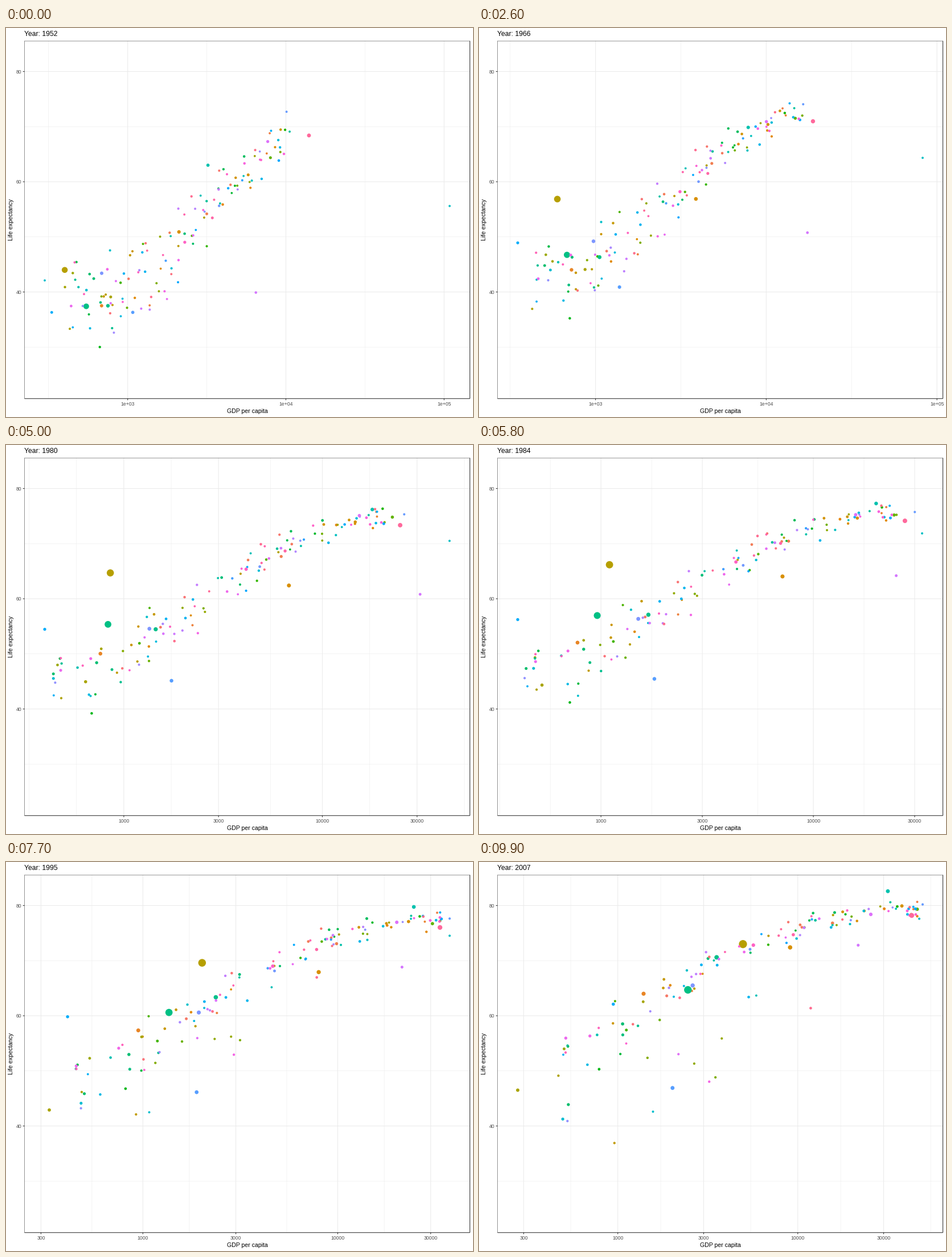
A matplotlib script for the animation above (10 s loop, 820 by 683 pixels).

```python
import numpy as np
import matplotlib.pyplot as plt
from matplotlib.animation import FuncAnimation
from matplotlib.collections import LineCollection

W, H, DPI = 820, 683, 64
PT = 72 / DPI
LEFT, RIGHT, TOP, BOTTOM = 32.45, 814.52, 22.7, 650.7
FRAMES, COUNTRIES = 100, 142
T = np.linspace(0, 1, FRAMES)
YEARS = 1952 + 55 * T
rng = np.random.default_rng(12)


def track(points):
    """Log GDP (and life expectancy) along a few dated key points."""
    years, gdp, *life = zip(*points)
    g = np.interp(YEARS, years, np.log10(gdp))
    return (g, np.interp(YEARS, years, life[0])) if life else g


# poorest and richest economy: these bound the x axis
LOW = track([(1952, 299), (1960, 365), (1967, 349), (1977, 371), (1982, 424),
             (1992, 347), (2002, 241), (2007, 278)])
HIGH = track([(1952, 108400), (1957, 113500), (1967, 80900), (1972, 109300),
              (1982, 33700), (1987, 31500), (2007, 49400)])

# hue rank: millions of people, then (year, GDP per capita, life expectancy)
KEY = {
    24: (1318, [(1952, 400, 44), (1957, 576, 50.5), (1962, 488, 44.5),
                (1967, 613, 58.4), (1980, 860, 64.8), (2000, 2720, 71.3),
                (2007, 4959, 73)]),
    58: (1110, [(1952, 547, 37.4), (1980, 835, 55.5), (2000, 1618, 62.4),
                (2007, 2452, 64.7)]),
    134: (301, [(1952, 13990, 68.4), (2007, 42952, 78.2)]),
    59: (224, [(1952, 750, 37.5), (1980, 1455, 54.6), (2007, 3541, 70.6)]),
    14: (190, [(1952, 2109, 50.9), (1980, 6850, 62.5), (2007, 9066, 72.4)]),
    97: (169, [(1952, 685, 43.4), (2007, 2606, 65.5)]),
    8: (150, [(1952, 684, 37.5), (1989, 790, 54.2), (2007, 1391, 64)]),
    94: (135, [(1952, 1077, 36.3), (1980, 1745, 45.2), (2007, 2014, 46.9)]),
    66: (127, [(1952, 3217, 63), (1980, 18100, 76.3), (2007, 31656, 82.6)]),
    71: (2.5, [(1952, 120000, 55.6), (1972, 140000, 67.7), (1982, 31354, 71.3),
               (2007, 47307, 77.6)]),
    95: (4.6, [(1952, 10095, 72.7), (1987, 33000, 76), (2007, 50000, 80.2)]),
    109: (28, [(1952, 6460, 39.9), (1977, 36000, 58.7), (1987, 21198, 66.3),
               (2007, 21655, 72.8)]),
    87: (48, [(1952, 331, 36.3), (1967, 340, 49.4), (1992, 340, 59.3),
              (2007, 944, 62.1)]),
    27: (65, [(1952, 781, 39.1), (1972, 905, 46), (1997, 300, 42.6),
              (2007, 278, 46.5)]),
    73: (2, [(1952, 290, 42.1), (2007, 1569, 42.6)]),
}


def sigmoid(x):
    return 1 / (1 + np.exp(-x))


def develop(rank):
    """Growth for a wealth rank in 0..1, with life expectancy following income."""
    r = np.clip(rank + rng.normal(0, 0.1) * T, 0, 1)
    phase, speed = rng.uniform(0, 2 * np.pi), rng.uniform(1, 3)
    wave = np.sin(phase + 2 * np.pi * speed * T)
    g = 2.62 + 0.08 * T + (1.4 + 0.95 * T) * r - 0.4 * T * r ** 2 + 0.03 * wave
    g = np.clip(g, LOW + 0.03, HIGH - 0.03)
    s = sigmoid((g - 3.5 + 0.3 * T) / (0.3 + 0.08 * T))
    start, end = np.clip(rng.normal(0, 1, 2), -1.8, 1.8)
    luck = start + 0.5 * (end - start) * T
    life = 34 + 9 * T + (40 - 3 * T) * s + luck * (1 + 4.5 * (1 - s)) + 0.4 * wave
    if rank < 0.7 and rng.random() < 0.14:  # late epidemic
        fall = np.clip((YEARS - 1985) / 20, 0, 1)
        life = life - rng.uniform(8, 20) * fall * fall * (3 - 2 * fall)
    return g, life


def hue(rank):
    """HCL colour with luminance 65 and chroma 100, as sRGB."""
    h = np.radians(15 + 360 * rank / COUNTRIES)
    lum = 65
    y = ((lum + 16) / 116) ** 3
    u = 100 * np.cos(h) / (13 * lum) + 0.1978
    v = 100 * np.sin(h) / (13 * lum) + 0.4683
    xyz = np.array([9 * y * u / (4 * v), y, y * (12 - 3 * u - 20 * v) / (4 * v)])
    lin = np.array([[3.2405, -1.5371, -0.4985],
                    [-0.9693, 1.8760, 0.0416],
                    [0.0556, -0.2040, 1.0572]]) @ xyz
    lin = np.clip(lin, 0, 1)
    return np.clip(np.where(lin > 0.00304, 1.055 * lin ** (1 / 2.4) - 0.055,
                            12.92 * lin), 0, 1)


gdp = np.zeros((COUNTRIES, FRAMES))
life = np.zeros((COUNTRIES, FRAMES))
people = np.clip(np.exp(rng.normal(2.1, 1.15, COUNTRIES)), 0.3, 85)

for k, (millions, points) in KEY.items():
    people[k] = millions
    g, life[k] = track(points)
    gdp[k] = np.clip(g, LOW, HIGH)
others = rng.permutation([k for k in range(COUNTRIES) if k not in KEY])
for n, k in enumerate(others):
    gdp[k], life[k] = develop((n + rng.random()) / len(others))

diameter = 3.55 + 10.65 * np.sqrt(people[:, None] * (0.42 + 0.58 * T) / 1318)


def y_px(years):
    return 463.5 - (years - 40) * 9.677


fig = plt.figure(figsize=(W / DPI, H / DPI), dpi=DPI, facecolor="white")
ax = fig.add_axes([0, 0, 1, 1])
ax.set_xlim(0, W)
ax.set_ylim(H, 0)
ax.axis("off")


def text(x, y, s, px, color="black", ha="center", **kw):
    return ax.text(x, y, s, fontsize=px * PT, color=color, ha=ha, va="baseline",
                   family="Liberation Sans", **kw)


def lines(segments, color, px, z):
    return ax.add_collection(LineCollection(
        segments, colors=color, linewidths=px * PT, zorder=z,
        capstyle="butt", snap=False))


def upright(xs):
    return [[(x, TOP), (x, BOTTOM)] for x in xs]


def level(values):
    return [[(LEFT, y_px(v)), (RIGHT, y_px(v))] for v in values]


GRID, INK, TICK_TEXT = "#ebebeb", "#333333", "#4d4d4d"
THIN, LINE, TICK = 0.53, 1.07, 2.75
lines(level([30, 50, 70]), GRID, THIN, 1)
lines(level([40, 60, 80]), GRID, LINE, 1)
minor = lines([], GRID, THIN, 1)
major = lines([], GRID, LINE, 1)
dots = ax.scatter(np.zeros(COUNTRIES), np.zeros(COUNTRIES), zorder=3, linewidths=0,
                  c=[hue(k) for k in range(COUNTRIES)])

# the panel clips the outer half of its left and top border
inner = THIN / 2
lines([[(LEFT + inner, TOP), (LEFT + inner, BOTTOM)],
       [(LEFT, TOP + inner), (RIGHT, TOP + inner)]], INK, THIN, 4)
lines([[(RIGHT, TOP), (RIGHT, BOTTOM)], [(LEFT, BOTTOM), (RIGHT, BOTTOM)]], INK, LINE, 4)
lines([[(LEFT - TICK, y_px(v)), (LEFT, y_px(v))] for v in (40, 60, 80)], INK, LINE, 4)
ticks = lines([], INK, LINE, 4)

for v in (40, 60, 80):
    text(27.6, y_px(v) + 3.2, str(v), 8.6, TICK_TEXT, "right")
text(423.7, 675.5, "GDP per capita", 10.5)
text(12.5, 336.5, "Life expectancy", 10.5, rotation=90, rotation_mode="anchor")
title = text(32.3, 14.3, "", 12.1, ha="left")
labels = [text(0, 662.6, "", 8.6, TICK_TEXT) for _ in range(6)]


def breaks(lo, hi):
    """Whole powers of ten if three fit, otherwise threes as well."""
    powers = [p for p in range(2, 6) if lo <= p <= hi]
    if len(powers) >= 3:
        return powers, [f"1e+{p:02d}" for p in powers]
    values = [m * 10 ** p for p in range(2, 6) for m in (1, 3)]
    values = [v for v in values if lo <= np.log10(v) <= hi]
    return [np.log10(v) for v in values], [str(v) for v in values]


def update(i):
    span = HIGH[i] - LOW[i]
    lo, hi = LOW[i] - 0.05 * span, HIGH[i] + 0.05 * span

    def x_px(g):
        return LEFT + (RIGHT - LEFT) * (np.asarray(g) - lo) / (hi - lo)

    title.set_text(f"Year: {round(YEARS[i])}")
    dots.set_offsets(np.column_stack([x_px(gdp[:, i]), y_px(life[:, i])]))
    dots.set_sizes((diameter[:, i] * PT) ** 2)

    at, names = breaks(lo, hi)
    step = at[1] - at[0]
    wide = np.array([at[0] - step, *at, at[-1] + step])
    halves = np.concatenate([wide[[0, -1]], (wide[1:] + wide[:-1]) / 2])
    xs = x_px(at)
    major.set_segments(upright(xs))
    minor.set_segments(upright([x for x in x_px(halves) if LEFT < x < RIGHT]))
    ticks.set_segments([[(x, BOTTOM), (x, BOTTOM + TICK)] for x in xs])
    for k, label in enumerate(labels):
        shown = k < len(names)
        label.set_text(names[k] if shown else "")
        label.set_x(xs[k] if shown else 0)
    return title, dots, major, minor, ticks, *labels


anim = FuncAnimation(fig, update, frames=FRAMES, interval=100, repeat=True,
                     repeat_delay=0, blit=False)
plt.show()
```
